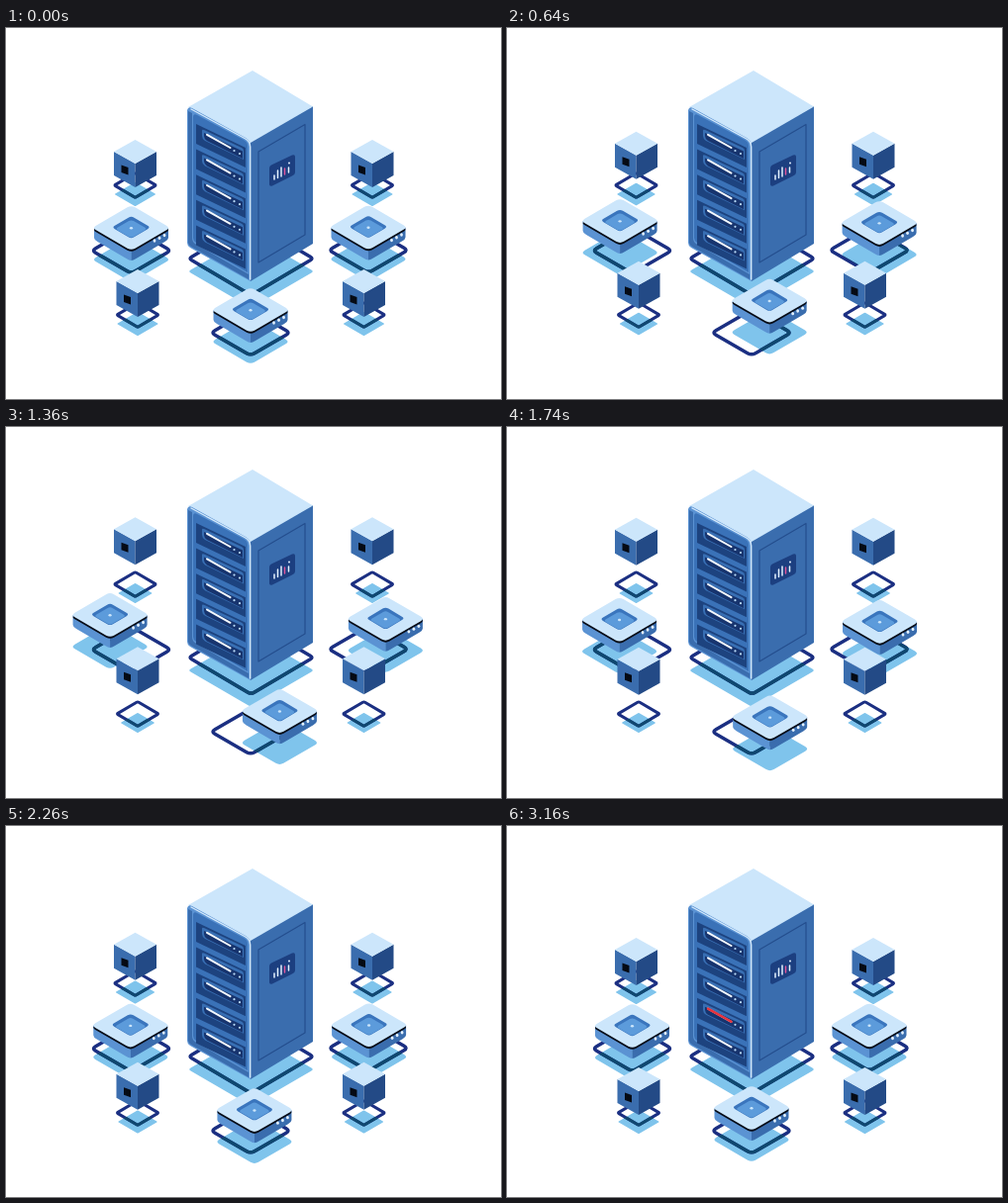
Write an HTML page that moves like this. It is 500 px wide and 375 px high and loops after 3.6 s.

```html
<!DOCTYPE html>
<html lang="en">
<head>
<meta charset="utf-8">
<title>Server network</title>
<style>
  html, body { margin: 0; width: 100%; height: 100%; overflow: hidden; background: #fff; }
  svg { display: block; width: 100vw; height: 100vh; }
</style>
</head>
<body>
<svg id="stage" viewBox="0 0 500 375"></svg>
<script>
const LOOP = 3600;
const COLOR = {
  top: '#cce6fb', mid: '#3a6dae', dark: '#234a86', light: '#5b93d3',
  shadow: '#7fc4ec', ring: '#1b2f82', ringOnShadow: '#0f4870', red: '#e8323c'
};
const stage = document.getElementById('stage');

function add(parent, tag, attrs = {}) {
  const node = document.createElementNS('http://www.w3.org/2000/svg', tag);
  for (const key in attrs) node.setAttribute(key, attrs[key]);
  parent.appendChild(node);
  return node;
}
const fill = (parent, d, color) => add(parent, 'path', { d, fill: color });
const group = parent => add(parent, 'g');
const line = (parent, d, color, width) => add(parent, 'path', {
  d, fill: 'none', stroke: color, 'stroke-width': width,
  'stroke-linecap': 'round', 'stroke-linejoin': 'round'
});
const move = (node, x, y) => node.setAttribute('transform', `translate(${x} ${y})`);

// Isometric diamond with softened corners; k is the share of each edge that is rounded.
function diamond(cx, cy, w, h, k) {
  const corners = [[0, -h], [w, 0], [0, h], [-w, 0]];
  const mix = (a, b) => `${cx + a[0] + (b[0] - a[0]) * k} ${cy + a[1] + (b[1] - a[1]) * k}`;
  return corners.map((c, i) => {
    const prev = corners[(i + 3) % 4], next = corners[(i + 1) % 4];
    return `${i ? 'L' : 'M'}${mix(c, prev)}Q${cx + c[0]} ${cy + c[1]} ${mix(c, next)}`;
  }).join('') + 'Z';
}

let clipCount = 0;
// A floor ring with a pale shadow; the ring darkens where it crosses the shadow.
function floor(parent, ringPath, shadowPath, width) {
  const id = 'clip' + clipCount++;
  const shadow = fill(parent, shadowPath, COLOR.shadow);
  const clip = add(add(parent, 'clipPath', { id }), 'path', { d: shadowPath });
  line(parent, ringPath, COLOR.ring, width);
  line(parent, ringPath, COLOR.ringOnShadow, width).setAttribute('clip-path', `url(#${id})`);
  return transform => [shadow, clip].forEach(n => n.setAttribute('transform', transform));
}

function makeCube(x, y) {
  const root = group(stage);
  move(root, x, y);
  const setShadow = floor(root, diamond(0, 46, 21, 12.4, .05), diamond(0, 55, 21, 12.3, .04), 3);
  const body = group(root);
  fill(body, 'M-21.5 12L0 24V48L-21.5 36Z', COLOR.mid);
  fill(body, 'M21.5 12L0 24V48L21.5 36Z', COLOR.dark);
  fill(body, 'M0 0L21.5 12L0 24L-21.5 12Z', COLOR.top);
  fill(body, 'M-14 25.5L-7 28V35.5L-14 33Z', '#050a14');
  return lift => {
    move(body, 0, -21.7 * lift);
    const s = 1 - .18 * lift;
    setShadow(`translate(0 ${55 * (1 - s)}) scale(${s})`);
  };
}

function makeBox(x, y) {
  const root = group(stage);
  move(root, x, y);
  const setShadow = floor(root, diamond(0, 45, 40, 23, .1), diamond(0, 54, 39.5, 23, .1), 3.5);
  const body = group(root);
  fill(body, 'M-37.5 22V32Q-37.5 34-34 36L-5 53Q-2 55 0 55V40Z', COLOR.light);
  fill(body, 'M37.5 22V32Q37.5 34 34 36L5 53Q2 55 0 55V40Z', COLOR.mid);
  fill(body, diamond(0, 24, 39.5, 23, .1), '#060c18');
  fill(body, diamond(0, 22, 39.5, 23, .1), COLOR.top);
  fill(body, diamond(0, 21.5, 19.5, 11.5, .15), '#3a75bd');
  fill(body, diamond(0, 23, 16, 9.3, .15), '#5c9bdb');
  add(body, 'ellipse', { cx: 0, cy: 22.3, rx: 1.6, ry: 1.2, fill: COLOR.top });
  [[23.5, 35], [28.5, 32.3], [33.5, 29.5]].forEach(([cx, cy]) =>
    add(body, 'ellipse', { cx, cy, rx: 1.4, ry: 1.7, fill: '#e4f2ff' }));
  return (dx, dy) => {
    move(body, dx, dy);
    setShadow(`translate(${dx} ${dy})`);
  };
}

function makeServer() {
  const root = group(stage);
  floor(root, diamond(247.5, 233, 63, 37, .05), diamond(247.5, 246, 63.5, 37, .04), 3.5);
  fill(root, 'M247 112L310 79V218L247 256Z', COLOR.mid);
  fill(root, 'M249 43L310 79.5L247 116L184 80Z', COLOR.top);
  fill(root, 'M183 83Q184 79 188 81L242 111Q247 114 247 119V256L186 222Q183 220 183 217Z', COLOR.light);
  fill(root, 'M184 84V217Q184 219 187 221L245 254V249L191 218Q188 216 188 212V86Z', COLOR.mid);
  fill(root, 'M189 90Q189 86 193 88L240 113Q244 115 244 119V247L192 217Q189 215 189 212Z', '#3a72b8');
  line(root, 'M187 82L241 111.5Q246.7 114.5 246.7 120V254', '#d5eafc', 1.4);

  let alert;
  for (let i = 0; i < 5; i++) {
    const slot = group(root);
    move(slot, 0, i * 25.6);
    fill(slot, 'M192 97L242 121V141L192 117Z', '#1d437f');
    fill(slot, 'M198 104Q198 102 200 103L238 121Q240 122 240 124V133L201 114Q198 112 198 109Z', '#386fb4');
    fill(slot, 'M200 106L239 124.5V132L203 114Q200 112 200 109Z', '#17346e');
    line(slot, 'M203 107.8L226.5 121', '#f3f9ff', 2);
    if (i === 3) alert = line(slot, 'M203 107.8L226.5 121', COLOR.red, 2.4);
    [[230.5, 124], [236, 127]].forEach(([cx, cy]) =>
      add(slot, 'circle', { cx, cy, r: 1.1, fill: '#b9daf7' }));
  }

  line(root, 'M255 125L302 97.5V209L255 237Z', '#244e8e', 1.2);
  fill(root, 'M266 142Q266 139 269 138L289 128.5Q292 127.5 292 130V146Q292 148 289 149.5L269 159.5Q266 160.5 266 158Z', '#1c3f80');
  [[271, 149, 153], [274.5, 144, 151.5], [278, 141, 150], [285.5, 141, 146]].forEach(([x, a, b]) =>
    line(root, `M${x} ${a}V${b}`, '#e4f2ff', 1.5));
  line(root, 'M281.5 142V148', '#e0559c', 1.5);
  add(root, 'circle', { cx: 286, cy: 136.5, r: 1, fill: '#e4f2ff' });
  return alert;
}

const links = [
  [146, 176, 196, 206], [354, 172, 296, 205],
  [152, 290, 203, 259.5], [343, 290.5, 291, 260.5]
].map(ends => ({ ends, node: line(stage, '', '#2b2f8c', 1.2) }));
const alert = makeServer();
const cubes = [makeCube(130.5, 113), makeCube(370, 113)];
const leftBox = makeBox(126.5, 180);
const rightBox = makeBox(366, 179.5);
cubes.push(makeCube(133, 244), makeCube(361.5, 244));
const frontBox = makeBox(247, 263);

const ramp = (t, a, b) => Math.min(1, Math.max(0, (t - a) / (b - a)));
const ease = p => (1 - Math.cos(Math.PI * p)) / 2;
const frontPath = [[0, 0], [17, -10], [34, -.5], [17, 9.3], [0, 0]];

function draw(t) {
  const lift = ease(ramp(t, 380, 1000)) - ease(ramp(t, 1670, 2550));
  cubes.forEach(setLift => setLift(lift));

  const swing = ease(2 * ramp(t, 0, 2400));
  leftBox(-22.4 * swing, -12.6 * swing);
  rightBox(18.2 * swing, -8 * swing);

  const leg = Math.min(3, Math.floor(t / 600)), p = ramp(t, leg * 600, leg * 600 + 600);
  const from = frontPath[leg], to = frontPath[leg + 1];
  frontBox(from[0] + (to[0] - from[0]) * p, from[1] + (to[1] - from[1]) * p);

  const head = ramp(t, 2450, 2650), tail = ramp(t, 2565, 2725);
  for (const { ends: [x1, y1, x2, y2], node } of links) {
    const at = k => `${x1 + (x2 - x1) * k} ${y1 + (y2 - y1) * k}`;
    node.setAttribute('d', head > tail ? `M${at(tail)}L${at(head)}` : '');
  }
  alert.setAttribute('opacity', ramp(t, 2720, 3160));
}

const start = performance.now();
function tick() {
  draw((performance.now() - start) % LOOP);
  requestAnimationFrame(tick);
}
tick();
</script>
</body>
</html>
```
